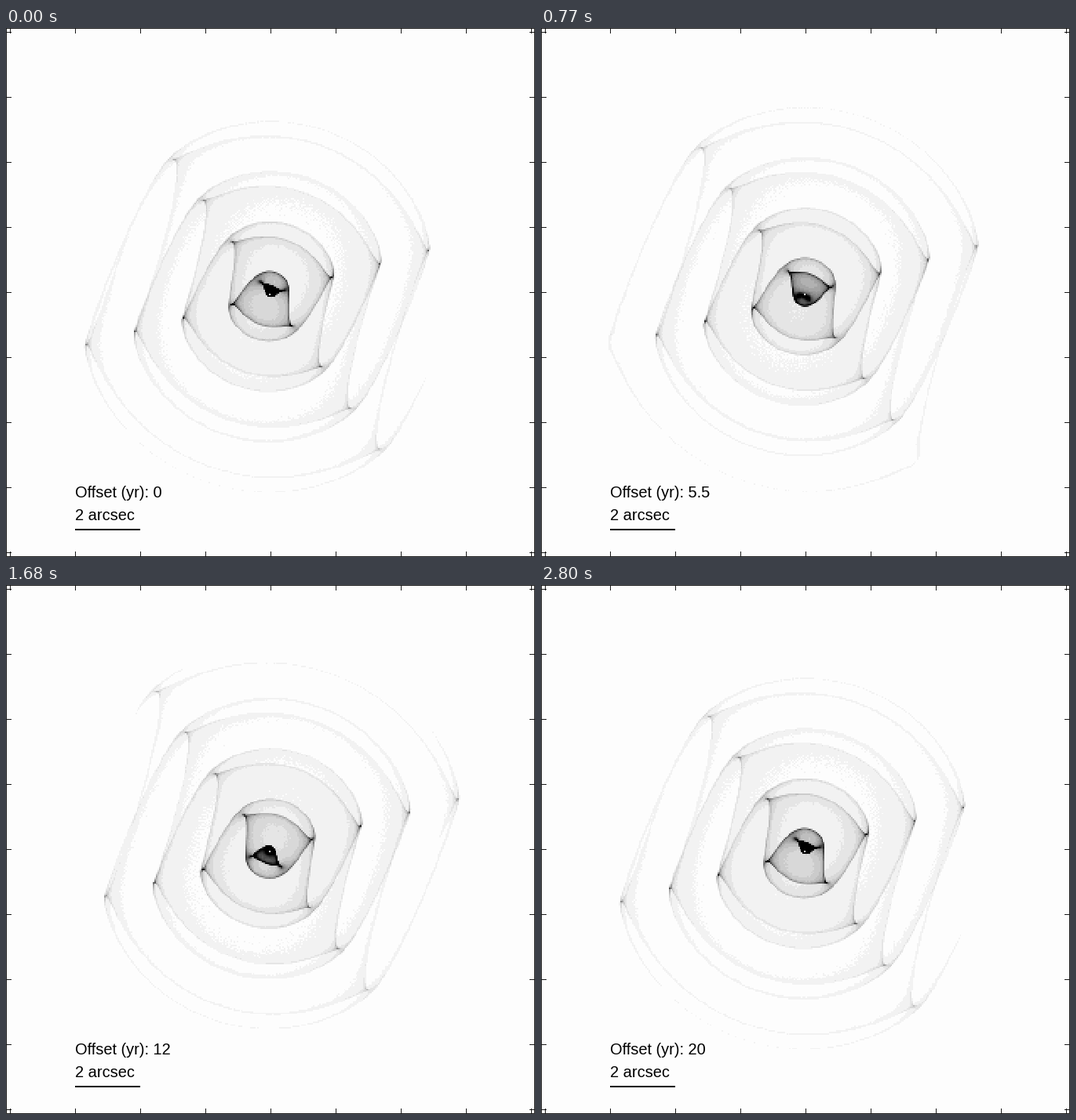
Write a matplotlib script that moves like this. It is 674 px wide and 675 px high and loops after 2.87 s.

```python
import numpy as np
import matplotlib.pyplot as plt
from matplotlib.animation import FuncAnimation

W, H = 674, 675
DPI = 100
FRAMES = 41
STEP = 0.5            # years per frame
PERIOD = 20.0         # orbital period, years
TURNS = 4             # dust is kept for this many orbits
SPEED = 64.6          # expansion in pixels per orbit
PHASE = 17.0 / SPEED  # orbital phase at offset 0, in turns
CX, CY = 335.8, 339.6
CONE = np.radians(55)     # half opening angle of the wind cone
TILT = np.radians(5.6)    # tilt of the orbital axis out of the sky plane
AXIS = np.radians(70.25)  # position angle of the projected axis

BINS = 360
POINTS = 360_000
GAIN = 0.35 * 360_000 / POINTS
LEVEL = 13            # grey step
INK = "#1a1a1a"
PX = 72 / DPI         # one pixel in points


def ejection_directions():
    """Projected unit directions of the dust and their emission phase."""
    i = np.arange(POINTS)
    turn = (i + 0.5) / POINTS
    theta = 2 * np.pi * turn
    phi = 2 * np.pi * ((i * (np.sqrt(5) - 1) / 2) % 1)
    ca, sa = np.cos(CONE), np.sin(CONE)
    ct, st = np.cos(theta), np.sin(theta)
    along, side, up = ca, sa * np.sin(phi), sa * np.cos(phi)
    major = along * ct - side * st
    minor = up * np.cos(TILT) - np.sin(TILT) * (along * st + side * ct)
    ux = major * np.cos(AXIS) - minor * np.sin(AXIS)
    uy = -major * np.sin(AXIS) - minor * np.cos(AXIS)
    return turn, ux, uy


TURN, UX, UY = ejection_directions()
BX, BY = BINS / W, BINS / H


def dust_image(offset):
    age = (offset / PERIOD + PHASE - TURN) % 1
    count = np.zeros(BINS * BINS)
    for k in range(TURNS):
        r = SPEED * (age + k)
        col = ((CX + UX * r) * BX).astype(int)
        row = ((CY + UY * r) * BY).astype(int)
        count += np.bincount(row * BINS + col, minlength=BINS * BINS)
    count = count.reshape(BINS, BINS)
    count[int(CY * BY), int(CX * BX)] = 0   # the star itself is masked
    dark = np.round(GAIN * count / LEVEL) * LEVEL
    return np.clip(255 - dark, 0, 253)


def line(xs, ys, width=1, color=INK):
    ax.plot(xs, ys, color=color, lw=width * PX, snap=False,
            solid_capstyle="butt", solid_joinstyle="miter")


def label(y, text):
    return ax.text(87.5, y, text, family="Liberation Sans", size=20 * PX,
                   color="black", va="baseline", ha="left")


fig = plt.figure(figsize=(W / DPI, H / DPI), dpi=DPI, facecolor="white")
ax = fig.add_axes([0, 0, 1, 1])
ax.axis("off")
image = ax.imshow(dust_image(0), cmap="gray", vmin=0, vmax=255,
                  extent=(0, W, H, 0), interpolation="nearest", aspect="auto")

left, right, top, bottom = 0.5, W - 0.5, 0.5, H - 0.5
line([left, right, right, left, left], [top, top, bottom, bottom, top])
for k in range(9):
    p = 5.5 + 83 * k
    line([p, p], [0, 7])
    line([p, p], [H - 7, H])
    line([0, 7], [p, p])
    line([W - 7, W], [p, p])

caption = label(599, "Offset (yr): 0")
label(628, "2 arcsec")
line([88, 171], [640, 640], 2, "black")
ax.set_xlim(0, W)
ax.set_ylim(H, 0)


def update(frame):
    offset = frame * STEP
    image.set_data(dust_image(offset))
    caption.set_text(f"Offset (yr): {offset:g}")
    return image, caption


anim = FuncAnimation(fig, update, frames=FRAMES, interval=70,
                     repeat=True, repeat_delay=0, blit=False)
plt.show()
```
